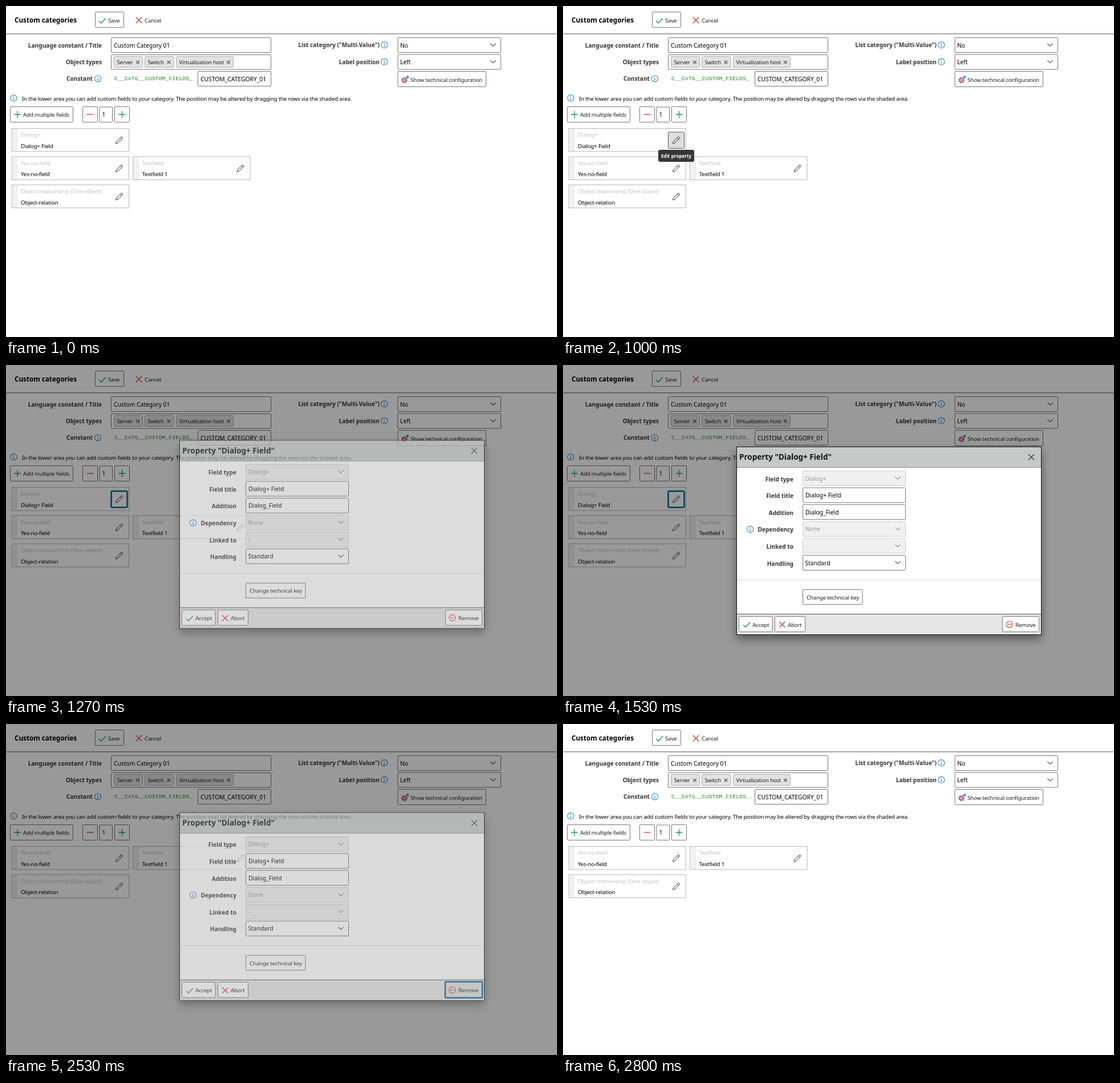
An HTML page that plays this animation: 966x580 px, repeating every 3470 ms.

```html
<!DOCTYPE html>
<html lang="en">
<head>
<meta charset="utf-8">
<title>Custom categories</title>
<style>
html, body { margin: 0; width: 100%; height: 100%; overflow: hidden; background: #fff; }
svg { display: block; width: 966px; height: 580px; }
text { font: 9.8px "Noto Sans", "Open Sans", sans-serif; letter-spacing: -.26px; fill: #222; white-space: pre; }
.in { font-size: 10.3px; letter-spacing: 0; fill: #000; }
.off { font-size: 10.3px; letter-spacing: 0; fill: #999; }
.type { letter-spacing: -.12px; fill: #c2c2c2; }
.name { letter-spacing: -.22px; fill: #000; }
.label { font-size: 10.15px; font-weight: 700; letter-spacing: 0; text-anchor: end; fill: #333; }
.head { font-size: 11.7px; font-weight: 700; letter-spacing: 0; fill: #000; }
.title { font-size: 13.5px; font-weight: 700; letter-spacing: 0; fill: #111; }
.tip { font-size: 8.1px; font-weight: 700; letter-spacing: 0; fill: #fff; }
.code { font: 9.93px "Liberation Mono", "Courier New", monospace; letter-spacing: 0; fill: #2c852c; }
path { fill: none; }
#dialog { filter: drop-shadow(0 7px 8px rgba(0, 0, 0, .45)); }
</style>
</head>
<body>
<svg viewBox="0 0 966 580">
  <defs>
    <pattern id="dots" width="3" height="3" patternUnits="userSpaceOnUse">
      <rect width="1.4" height="1.4" fill="#bbb"/>
    </pattern>
  </defs>
  <g id="page"></g>
  <g id="before"></g>
  <g id="after"></g>
  <g id="hover"></g>
  <g id="ring"></g>
  <g id="tip"></g>
  <rect id="shade" width="966" height="580" opacity=".4"/>
  <g id="dialog"><g id="panel"></g><g id="form"></g></g>
</svg>
<script>
const $ = id => document.getElementById(id);
const GREEN = '#12a04a', RED = '#e0392b', BLUE = '#2b8fd6', FOCUS = '#006496';

const text = (x, y, s, cls = '') => `<text x="${x}" y="${y}" class="${cls}">${s}</text>`;
const rect = (x, y, w, h, fill = '#fff', stroke = '#777', r = 1, sw = 1) =>
  `<rect x="${x}" y="${y}" width="${w}" height="${h}" rx="${r}" fill="${fill}" stroke="${stroke}" stroke-width="${sw}"/>`;
const line = (x, y, d, color, w = 1.2) =>
  `<path transform="translate(${x} ${y})" d="${d}" stroke="${color}" stroke-width="${w}"/>`;
const cross = (x, y, r, color, w) => line(x, y, `M${-r} ${-r}L${r} ${r}M${-r} ${r}L${r} ${-r}`, color, w);
const plus = (x, y) => line(x, y, 'M-6 0H6M0-6V6', GREEN, 1.3);
const check = (x, y) => line(x, y, 'M-6 .5L-2 4.5L6-4', GREEN, 1.4);
const chevron = (x, y, color = '#444') => line(x, y, 'M-4.5-2L0 2.3L4.5-2', color, 1.1);
const circle = (x, y, r, color) =>
  `<circle cx="${x}" cy="${y}" r="${r}" fill="none" stroke="${color}" stroke-width="1.1"/>`;
const info = (x, y) => circle(x, y, 5.6, BLUE) + line(x, y, 'M0-3.3V-2M0-.8V3.4', BLUE, 1.3);
const pencil = (x, y) => line(x, y,
  'M-6 6L-5 2.4L3.2-5.8Q4.2-6.6 5.2-5.6L5.8-5Q6.6-4 5.6-3L-2.6 5ZM1.8-4.5L4.4-1.9', '#333', 1);
const select = (x, y, w, s, off) =>
  rect(x, y, w, 26, off ? '#f0f0f0' : '#fff', off ? '#ccc' : '#777') +
  text(x + 4, y + 17, s, off ? 'off' : 'in') + chevron(x + w - 13.5, y + 12.5, off ? '#888' : '#444');
const input = (x, y, w, s) => rect(x, y, w, 26) + text(x + 4.5, y + 17, s, 'in');
const tag = (x, w, s) => rect(x, 88.5, w, 19, '#e2e2e2', '#aaa', 2) +
  text(x + 5, 102, s) + cross(x + w - 8.5, 98.5, 2.8, '#666', 1.6);
const gear = (x, y, r, color, w) => circle(x, y, r * .45, color) +
  `<circle cx="${x}" cy="${y}" r="${r}" fill="none" stroke="${color}" stroke-width="${w}" stroke-dasharray="${r * .393}"/>` +
  circle(x, y, r * .8, color);

const card = (col, row, type, name) => {
  const x = 10 + col * 212.5, y = 214.5 + row * 49.4;
  return rect(x, y, 205.5, 40.5, '#fff', '#b4b4b4', 0) +
    `<rect x="${x + 1}" y="${y + 1}" width="10" height="39" fill="url(#dots)"/>` +
    text(x + 16, y + 14.7, type, 'type') + text(x + 16, y + 34.2, name, 'name') +
    pencil(x + 188.5, y + 20.7);
};
const shared = row => card(0, row, 'Yes-no-field', 'Yes-no-field') +
  card(1, row, 'Textfield', 'Textfield 1') +
  card(0, row + 1, 'Object relationship (One object)', 'Object-relation');

$('page').innerHTML =
  text(15, 28.5, 'Custom categories', 'head') +
  rect(156.5, 10.5, 50, 27) + check(169, 25.5) + text(179, 28.5, 'Save') +
  cross(233, 25, 5.2, RED, 1.3) + text(243, 28.5, 'Cancel') +
  '<rect y="48" width="966" height="1.4" fill="#888"/>' +
  text(168, 72.5, 'Language constant / Title', 'label') + input(184.5, 55.5, 280, 'Custom Category 01') +
  text(168, 102, 'Object types', 'label') + rect(184.5, 85.5, 280, 25.5) +
  tag(189.5, 50, 'Server') + tag(243.5, 50.5, 'Switch') + tag(298.5, 100, 'Virtualization host') +
  text(152, 131, 'Constant', 'label') + info(161, 127.3) +
  text(190, 130.3, 'C__CATG__CUSTOM_FIELDS_', 'code') + input(336.5, 114.5, 128, 'CUSTOM_CATEGORY_01') +
  text(655, 72, 'List category ("Multi-Value")', 'label') + info(663.3, 68.2) + select(687, 55.5, 180.5, 'No') +
  text(655, 101.5, 'Label position', 'label') + info(663.3, 97.7) + select(687, 85, 180.5, 'Left') +
  rect(687, 114.5, 154.5, 27) + gear(698.5, 130, 4.4, '#a8457e', 2) + gear(704, 124.5, 1.9, BLUE, 1.2) +
  text(709, 132.5, 'Show technical configuration') +
  info(13.5, 161.2) +
  text(28, 166.3, 'In the lower area you can add custom fields to your category. The position may be altered by dragging the rows via the shaded area.', 'name') +
  rect(7.5, 176.5, 110, 27) + plus(20, 190) + text(30, 194, 'Add multiple fields') +
  rect(134.5, 176.5, 26, 27) + line(147.5, 190, 'M-6 0H6', RED, 1.3) +
  rect(164, 177, 22.5, 26.5) + text(168.5, 194, '1', 'in') +
  rect(190.5, 176.5, 26, 27) + plus(203.5, 190);

$('before').innerHTML = card(0, 0, 'Dialog+', 'Dialog+ Field') + shared(1);
$('after').innerHTML = shared(0);
$('hover').innerHTML = rect(184.5, 221, 28, 28.5, '#dedede', '#555', 2) + pencil(198.5, 235.2);
$('ring').innerHTML = rect(184.5, 221, 28, 28.5, '#fff', FOCUS, 2, 2.5) + pencil(198.5, 235.2);
$('tip').innerHTML = '<rect x="167" y="252" width="63" height="21" rx="3" fill="#363636"/>' +
  text(172, 266, 'Edit property', 'tip');

const fields = [
  ['Field type', 'Dialog+', 1], ['Field title', 'Dialog+ Field'], ['Addition', 'Dialog_Field'],
  ['Dependency', 'None', 1], ['Linked to', '-', 1], ['Handling', 'Standard', 0]
];
const remove = (fill, stroke, sw, grow) =>
  rect(770.5 - grow, 440.5 - grow, 64 + 2 * grow, 27 + 2 * grow, fill, stroke, 1, sw);

$('panel').innerHTML = rect(304.5, 143.5, 534, 329, '#fff', '#111', 0);
$('form').innerHTML =
  '<rect x="305" y="144" width="533" height="35" fill="#c7c9c9"/>' +
  '<rect x="305" y="179" width="533" height="1" fill="#888"/>' +
  text(309, 166, 'Property "Dialog+ Field"', 'title') + cross(821, 161.5, 5, '#333', 1.1) +
  fields.map(([label, value, off], i) => {
    const y = 185.5 + i * 29.6;
    return text(404, y + 18, label, 'label') +
      (off === undefined ? input(420.5, y, 180, value) : select(420.5, y, 180, value, off));
  }).join('') +
  info(328, 288) +
  '<rect x="305" y="376" width="533" height="1" fill="#ddd"/>' +
  rect(420.5, 393.5, 104.5, 26) + text(427, 410.8, 'Change technical key') +
  '<rect x="305" y="437" width="533" height="35" fill="#e6e6e6"/>' +
  '<rect x="305" y="436" width="533" height="1" fill="#555"/>' +
  rect(308.5, 440.5, 58.5, 27) + check(322, 455) + text(332, 458.6, 'Accept') +
  rect(371.5, 440.5, 53, 27) + cross(384.3, 454.8, 5, RED, 1.3) + text(394, 458.6, 'Abort') +
  remove('#fff', '#777', 1, 0) +
  `<g id="press">${remove('#dedede', '#555', 1, 0)}</g>` +
  `<g id="pressed">${remove('#dedede', FOCUS, 2.5, .5)}</g>` +
  circle(782.5, 454.3, 5.6, RED) + line(782.5, 454.3, 'M-3.2 0H3.2', RED) + text(793, 458.6, 'Remove');

const LOOP = 3470, STEP = 200 / 3;
const ramp = (t, from, length) => Math.min(1, Math.max(0, (t - from) / length));
const ease = p => 1.5 * p - .5 * p * p;
const show = (id, opacity) => {
  $(id).style.display = opacity > 0 ? '' : 'none';
  $(id).style.opacity = +opacity;
};

function draw(now) {
  const t = Math.floor((now % LOOP + 4) / STEP) * STEP;
  const opened = t > 1050 && t < 2790, removed = t > 2450;
  const enter = ease(ramp(t, 1035, 435)), leave = ease(ramp(t, 2440, 355));

  show('before', !removed);
  show('after', removed);
  show('hover', t < 1120 ? ramp(t, 680, 120) : 0);
  show('ring', removed ? 0 : t > 1120 ? 1 : t > 1050 ? .2 : 0);
  show('tip', t < 1050 ? ramp(t, 680, 120) : 0);

  $('shade').style.display = opened ? '' : 'none';
  show('dialog', opened ? enter * (1 - leave) : 0);
  $('dialog').setAttribute('transform', `translate(0 ${33 * (enter - 1 + leave)})`);
  show('form', t > 1120);
  show('press', ramp(t, 2010, 120));
  show('pressed', ramp(t, 2370, 90));
  requestAnimationFrame(() => draw(performance.now()));
}
draw(performance.now());
</script>
</body>
</html>
```
